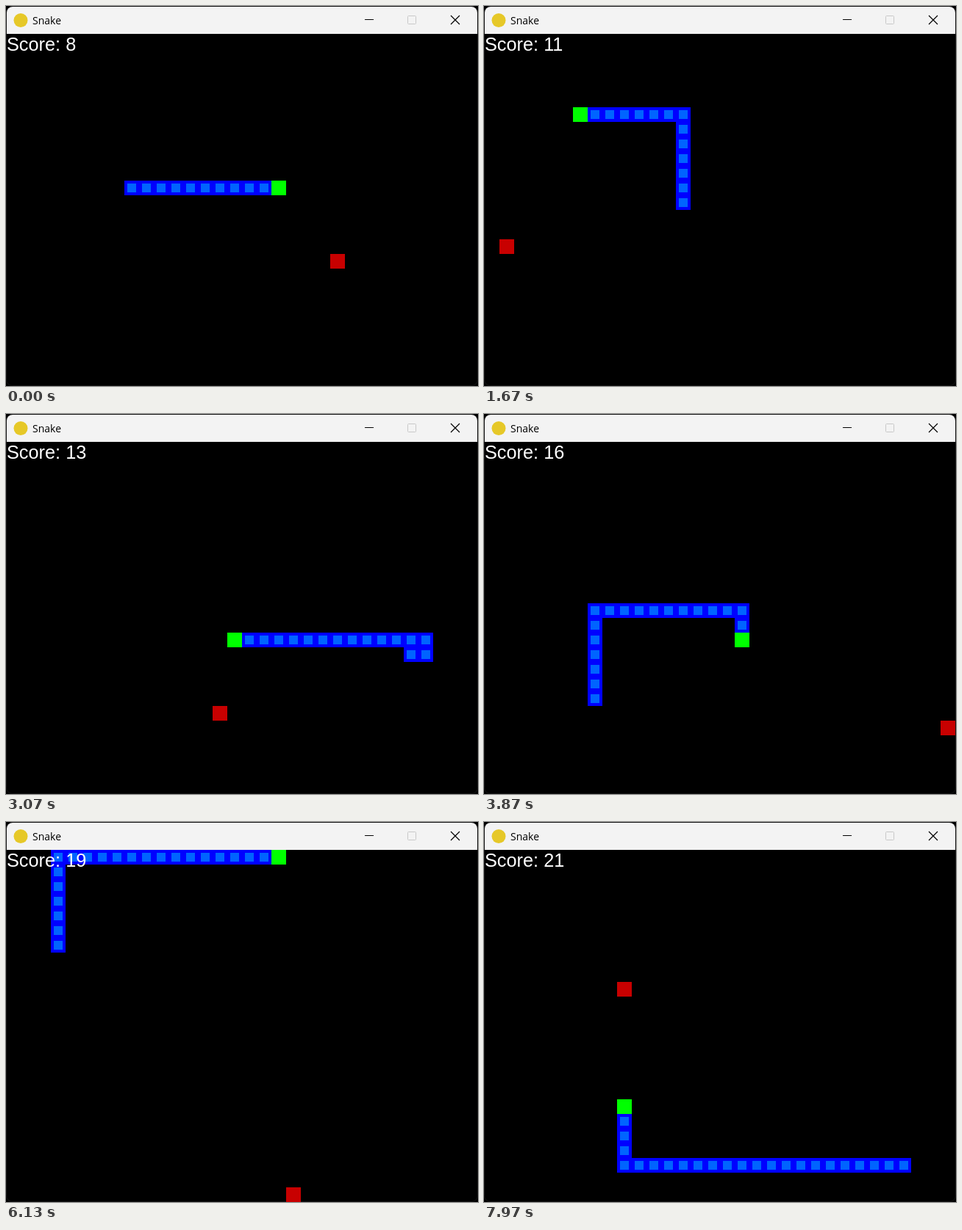
Animation of 642 by 518 pixels, one loop 8 s. Source, as an HTML page:

```html
<!DOCTYPE html>
<html lang="en">
<head>
<meta charset="utf-8">
<title>Snake</title>
<style>
  html, body { margin: 0; width: 100%; height: 100%; overflow: hidden; background: #000; }
  svg { position: absolute; left: 0; top: 0; display: block; }
  .title { font: 14px "Open Sans", "Noto Sans", sans-serif; }
  .score { font: 25.3px "Liberation Sans", Arial, sans-serif; fill: #fff; }
</style>
</head>
<body>
<svg width="642" height="518" viewBox="0 0 642 518">
  <rect x=".5" y=".5" width="641" height="517" rx="8" fill="#000" stroke="#141414"/>
  <path d="M1 38V9a8 8 0 0 1 8-8H633a8 8 0 0 1 8 8V38Z" fill="#f3f3f3"/>
  <circle cx="20" cy="19.5" r="9.5" fill="#e6c828"/>
  <text class="title" x="36" y="25">Snake</text>
  <g fill="none" stroke="#000">
    <path d="M488 18.5H500"/>
    <rect x="546.5" y="13.5" width="11" height="11" rx="1" stroke="#c8c8c8"/>
    <path d="M605 13L617 25M617 13L605 25" stroke-width="1.2"/>
  </g>
  <g transform="translate(1 38)" shape-rendering="crispEdges">
    <path id="food" fill="#c80000"/>
    <path id="body" fill="#00f"/>
    <path id="cores" fill="#0064ff"/>
    <path id="head" fill="#0f0"/>
  </g>
  <text class="score" id="score" x="1" y="61"></text>
</svg>
<script>
const CELL = 20, LOOP = 8000, TICK = 100 / 3;
const FIRST_SCORE = 8, EXTRA_CELLS = 3;

const foods = [
  [22, 15], [30, 22], [13, 5], [1, 14], [28, 13], [14, 18], [7, 11],
  [17, 13], [31, 19], [0, 7], [3, 0], [19, 23], [31, 21], [9, 9]
];
// Pace of the game: [tick, moves made].
const pace = [[0, 0], [32, 42], [67, 87], [116, 152], [151, 196], [184, 240], [239, 304]];

// The snake crosses to the food's column first, then goes up or down to it.
const route = [];
const start = FIRST_SCORE + EXTRA_CELLS - 1;
for (let x = 8; x <= 18; x++) route.push({ x, y: 10, eaten: 0 });
foods.forEach(([fx, fy], i) => {
  let { x, y } = route.at(-1);
  while (x !== fx || y !== fy) {
    if (x !== fx) x += Math.sign(fx - x);
    else y += Math.sign(fy - y);
    route.push({ x, y, eaten: i });
  }
  route.at(-1).eaten = i + 1;
});

const [food, body, cores, head, score] =
  ["food", "body", "cores", "head", "score"].map(id => document.getElementById(id));

function paint(path, cells, inset = 0) {
  const size = CELL - 2 * inset;
  path.setAttribute("d", cells.map(({ x, y }) =>
    `M${x * CELL + inset} ${y * CELL + inset}h${size}v${size}h${-size}z`).join(""));
}

function movesAt(tick) {
  const i = Math.max(1, pace.findIndex(([t]) => t >= tick));
  const [t0, m0] = pace[i - 1], [t1, m1] = pace[i];
  return Math.floor(m0 + (m1 - m0) * (tick - t0) / (t1 - t0) + 1e-6);
}

function draw(ms) {
  // Ticks start on the nearest 10 ms.
  const tick = Math.min(239, Math.floor((ms % LOOP + 3.4) / TICK));
  const at = start + movesAt(tick);
  const { eaten } = route[at];
  const points = FIRST_SCORE + eaten;
  const cells = route.slice(at - points - EXTRA_CELLS + 1, at);
  const [x, y] = foods[eaten];
  paint(food, [{ x, y }]);
  paint(body, cells);
  paint(cores, cells, 4);
  paint(head, [route[at]]);
  score.textContent = "Score: " + points;
}

const began = performance.now();
function loop() {
  draw(performance.now() - began);
  requestAnimationFrame(loop);
}
loop();
</script>
</body>
</html>
```
